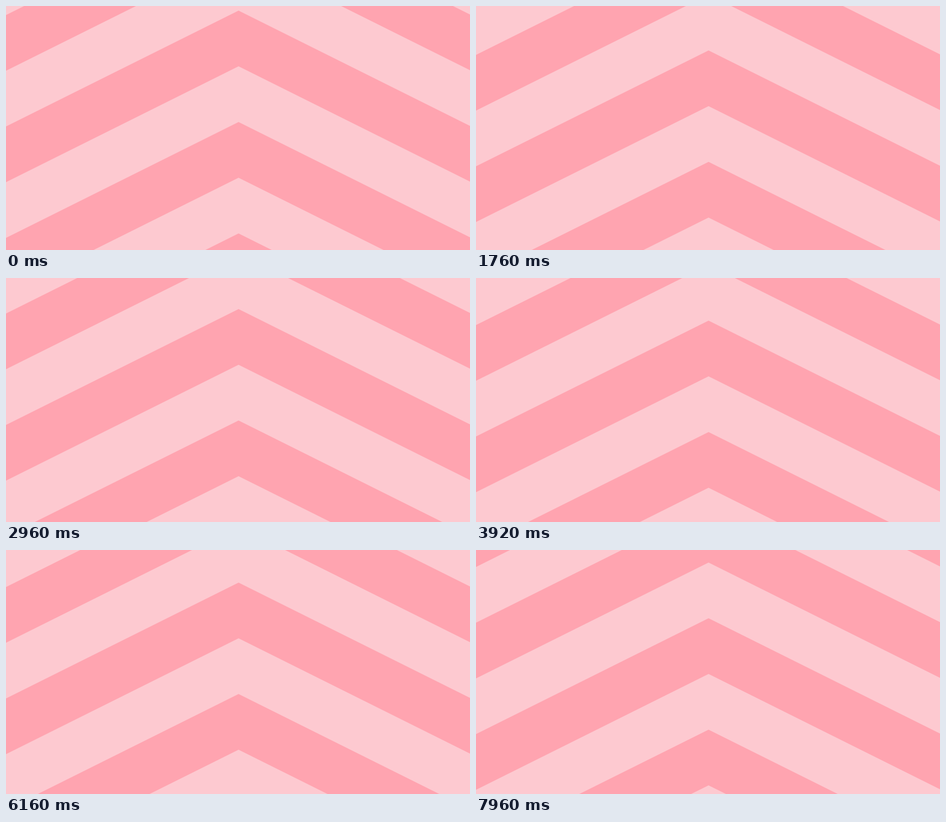
An HTML page with a canvas that plays this animation: 830 px wide and 438 px high, repeating every 8000 ms.

```html
<!DOCTYPE html>
<html lang="en">
<head>
<meta charset="utf-8">
<title>Rising chevrons</title>
<style>
  html, body { margin: 0; width: 100%; height: 100%; overflow: hidden; background: #fdc9d0; }
  canvas { display: block; }
</style>
</head>
<body>
<canvas id="stage" width="830" height="438"></canvas>
<script>
const WIDTH = 830, HEIGHT = 438;
const LIGHT = '#fdc9d0', DARK = '#ffa4b0';
const APEX_X = 416, SLOPE = 0.5;
const BAND = 100, PERIOD = 2 * BAND;
const LOOP = 8000, STEP = 40;
const START_Y = 8.3, SPEED = 0.56 / 3; // px and px per ms, upwards

const ctx = document.getElementById('stage').getContext('2d');
const leftDrop = APEX_X * SLOPE;
const rightDrop = (WIDTH - APEX_X) * SLOPE;

function chevron(y) {
  ctx.beginPath();
  ctx.moveTo(0, y + leftDrop);
  ctx.lineTo(APEX_X, y);
  ctx.lineTo(WIDTH, y + rightDrop);
  ctx.lineTo(WIDTH, y + rightDrop + BAND);
  ctx.lineTo(APEX_X, y + BAND);
  ctx.lineTo(0, y + leftDrop + BAND);
  ctx.fill();
}

function draw(ms) {
  const time = Math.floor(((ms + 1) % LOOP) / STEP) * STEP;
  const shift = (START_Y - SPEED * time) % PERIOD;
  ctx.fillStyle = LIGHT;
  ctx.fillRect(0, 0, WIDTH, HEIGHT);
  ctx.fillStyle = DARK;
  for (let y = shift - 2 * PERIOD; y < HEIGHT; y += PERIOD) chevron(y);
}

const start = performance.now();
function tick() {
  draw(performance.now() - start);
  requestAnimationFrame(tick);
}
tick();
</script>
</body>
</html>
```
